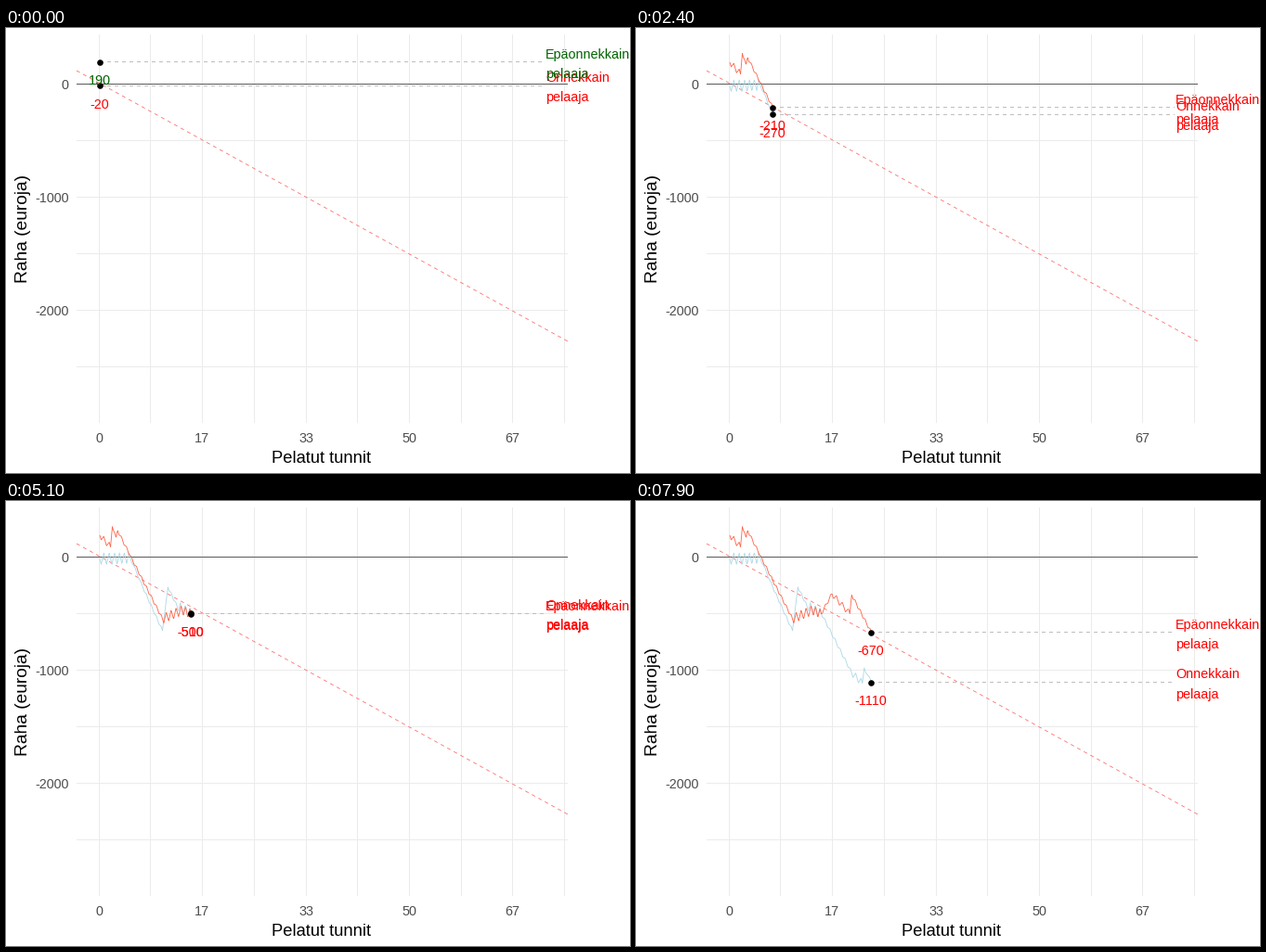
Write a matplotlib script that moves like this. It is 672 px wide and 480 px high and loops after 8000 ms.

```python
import math
import numpy as np
import matplotlib.pyplot as plt
from matplotlib.animation import FuncAnimation

W, H, DPI = 672, 480, 96
FRAMES, INTERVAL = 80, 100
PX = 72 / DPI                      # one pixel in points
LEFT, RIGHT, TOP, BOTTOM = 76, 605, 7, 426
ZERO, UNIT = 60.5, 0.122           # row of 0 euros, pixels per euro
X0, STEP = 101, 1.93               # marker start and advance per frame
LABEL_X = 581

plt.rcParams["font.family"] = "Liberation Sans"
fig = plt.figure(figsize=(W / DPI, H / DPI), dpi=DPI, facecolor="white")
ax = fig.add_axes([0, 0, 1, 1])
ax.set_xlim(0, W)
ax.set_ylim(H, 0)
ax.axis("off")


def line(xs, ys, color, width=1, dashed=False, z=1):
    dash = 4 / width
    style = (0, (dash, dash)) if dashed else "-"
    return ax.plot(xs, ys, color=color, lw=width * PX, ls=style, zorder=z,
                   snap=False, dash_capstyle="butt",
                   solid_capstyle="butt")[0]


def text(x, y, s, color, size=14.4, ha="center", z=6, **kw):
    return ax.text(x, y, s, color=color, fontsize=size * PX, ha=ha,
                   va="baseline", zorder=z, **kw)


def draw_panel():
    for i in range(10):
        x = math.floor(100.2 + 55.7 * i) + 0.5
        line([x, x], [TOP, BOTTOM], "#EBEBEB")
        if i % 2 == 0:
            text(x - 0.5, 447, str(round(i * 25 / 3)), "#4D4D4D")
    for i in range(6):
        y = ZERO + 61 * i
        line([LEFT, RIGHT], [y, y], "#EBEBEB")
        if i % 2 == 0:
            text(67.5, y + 6, str(-500 * i), "#4D4D4D", ha="right")
    line([LEFT, RIGHT], [ZERO, ZERO], "#5A5A5A", z=2)
    line([LEFT, RIGHT], [46, 338], "#FF6F6F", 0.85, dashed=True, z=2)
    text(339.5, 469, "Pelatut tunnit", "black", 18.4)
    text(23.5, 216, "Raha (euroja)", "black", 19.1, rotation=90,
         rotation_mode="anchor")


def balance(keys, t):
    """Money over time: key points joined by teeth, tallest where it is flat."""
    kt, km = np.array(keys, float).T
    seg = np.clip(np.searchsorted(kt, t, "right") - 1, 0, len(kt) - 2)
    span = np.diff(kt)[seg]
    slope = np.diff(km)[seg] / span
    u = (t - kt[seg]) / span
    teeth = np.maximum(1, np.round(span / 3))
    wave = np.arcsin(np.sin(2 * np.pi * teeth * u)) * 2 / np.pi
    return km[seg] + slope * span * u - 50 / (1 + (slope / 20) ** 2) * wave


class Player:
    def __init__(self, name, color, keys):
        self.t = np.arange(0, FRAMES, 0.25)
        self.t = self.t[self.t < FRAMES - 0.9]
        self.money = balance(keys, self.t)
        self.trail = line([], [], color, 0.85, z=3)
        self.guide = line([], [], "#BEBEBE", dashed=True, z=2.5)
        self.dot = ax.plot([], [], "o", ms=6.6 * PX, color="black",
                           mew=0, zorder=5)[0]
        self.amount = text(0, 0, "", "red")
        self.names = [text(LABEL_X, 0, s, "red", ha="left")
                      for s in (name, "pelaaja")]

    def update(self, frame):
        shown = self.t <= frame
        xs = X0 + STEP * self.t[shown]
        ys = ZERO - UNIT * self.money[shown]
        x, y, money = xs[-1], ys[-1], self.money[shown][-1]
        self.trail.set_data(xs, ys)
        row = math.floor(y) + 0.5
        self.guide.set_data([math.floor(x), LABEL_X - 1], [row, row])
        self.dot.set_data([x], [y])
        rounded = math.floor(money / 10) * 10
        self.amount.set_text(str(rounded))
        self.amount.set_position((x - 0.5, y + 24.5))
        for label, dy in zip(self.names, (-4.2, 17.2)):
            label.set_y(y + dy)
        for label in (self.amount, *self.names):
            label.set_color("darkgreen" if rounded >= 0 else "red")


draw_panel()
players = [
    Player("Onnekkain", "lightblue", [
        (0, -14), (9, -15), (17, -5), (24, -267), (35, -651), (38, -265),
        (43, -430), (51, -496), (68, -1022), (74, -1115), (75, -980),
        (79, -1108)]),
    Player("Epäonnekkain", "tomato", [
        (0, 194), (6, 90), (7, 270), (9, 176), (10, 233), (24, -207),
        (35, -546), (46, -470), (51, -502), (57, -325), (67, -500),
        (68, -334), (79, -668)]),
]


def update(frame):
    for player in players:
        player.update(frame)
    return []


anim = FuncAnimation(fig, update, frames=FRAMES, interval=INTERVAL,
                     repeat=True, repeat_delay=0, blit=False)
plt.show()
```
